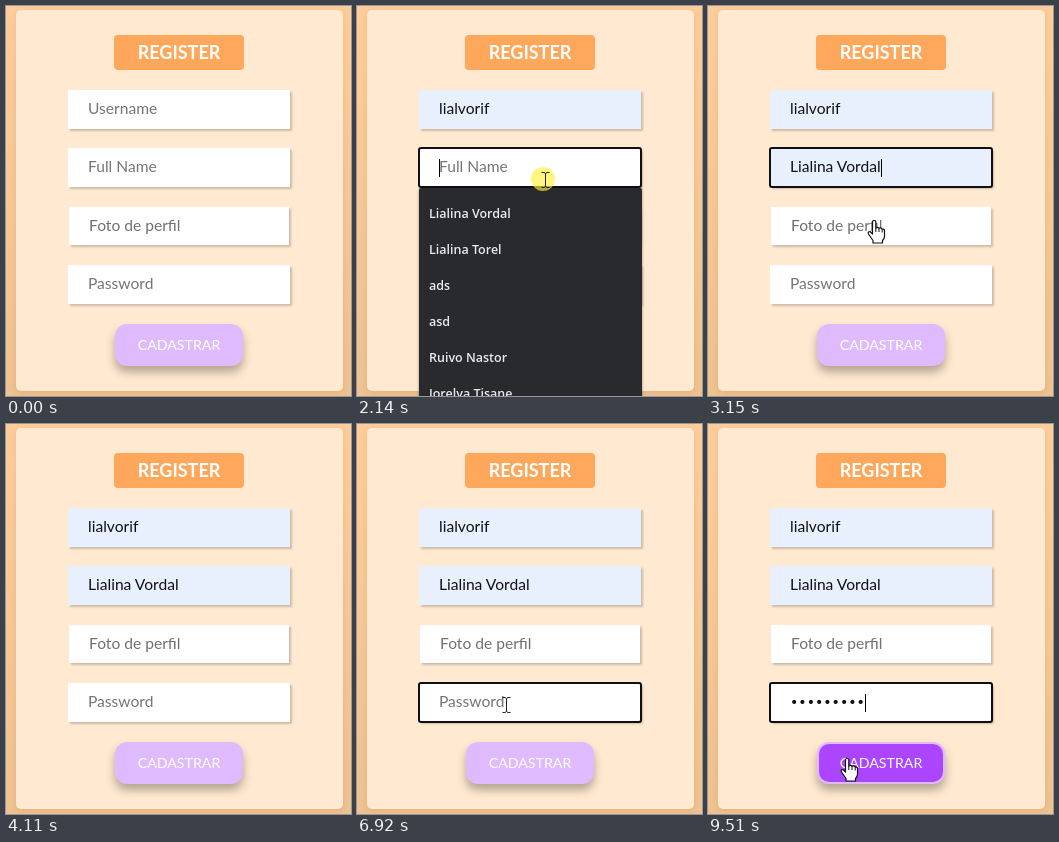
These frames come from a looping animation (345 by 390 pixels, 9540 ms). An HTML page:

```html
<!DOCTYPE html>
<html lang="pt">
<head>
<meta charset="utf-8">
<title>Register</title>
<style>
  html, body { margin: 0; width: 100%; height: 100%; overflow: hidden; }
  body { position: relative; background: linear-gradient(#ffcd9a, #efc291); font: 15.6px Lato, sans-serif; }
  body * { box-sizing: border-box; }
  .card, .title, .field, .list, .button, #pointer, #pointer > * { position: absolute; }
  .card { left: 10px; top: 4px; width: 327px; height: 381px; border-radius: 5px; background: #ffe9d0; box-shadow: 0 2px 6px #9a5c2026; }
  .title { left: 108px; top: 29px; width: 130px; height: 35px; border-radius: 4px; background: #ffa75a;
    color: #fff; font-weight: 700; font-size: 18px; line-height: 34px; text-align: center; }
  .field { left: 62px; width: 222px; height: 38.5px; padding-left: 20px; background: #fff; color: #111;
    line-height: 37.5px; white-space: pre; box-shadow: 2px 2px 2px #0003; }
  .field.upload { left: 63px; width: 220px; color: #707070; }
  .field.filled { background: #e8f0fe; }
  .field.focus { outline: 2px solid #101014; outline-offset: -1px; border-radius: 2px; }
  .field.preview { font: 13px/37.5px "Open Sans", sans-serif; }
  .field.secret .value { font: 14.1px/37.5px "DejaVu Sans", sans-serif; }
  .hint { color: #757575; }
  .caret { display: inline-block; width: 1px; height: 18px; margin-right: -1px; background: #000; vertical-align: middle; }
  .button { left: 109px; top: 318px; width: 128px; height: 42px; border: 2px solid #e0bafe; border-radius: 12px;
    background: #e0bafe; color: #fff; font-size: 14.2px; line-height: 38px; text-align: center; box-shadow: 0 6px 10px #0000004d; }
  .button.hover { background: #ab45ff; }
  .list { left: 62px; width: 223px; height: 232px; padding: 8px 0; border-radius: 2px; background: #292a2d;
    color: #e8eaed; font: 600 12.5px/36px "Open Sans", sans-serif; box-shadow: 0 1px 3px #0006; }
  .list div { padding-left: 10px; }
  .list .hover { background: #3f4042; }
  #pointer { left: 0; top: 0; }
  #click { left: -14px; top: -13px; width: 24px; height: 24px; border-radius: 50%; background: #fff23ca8; }
  #pointer svg { left: 0; top: 0; overflow: visible; }
</style>
</head>
<body>
<div class="card"></div>
<div class="title">REGISTER</div>
<div class="field" id="user" style="top:84px"></div>
<div class="field" id="name" style="top:142px"></div>
<div class="field upload" style="top:200.5px">Foto de perfil</div>
<div class="field secret" id="pass" style="top:259px"></div>
<div class="button" id="button">CADASTRAR</div>
<div class="list" id="users" style="top:124px"></div>
<div class="list" id="names" style="top:182px"></div>
<div id="pointer">
  <div id="click"></div>
  <svg id="arrow" width="1" height="1"><path d="M.5.5V16.5L4.2 13 6.8 19 9.4 17.9 6.8 12H11.8Z" fill="#fff" stroke="#111"/></svg>
  <svg id="beam" width="1" height="1"><path d="M-3.5-7.5H-1L.5-6.5 2-7.5H4.5M.5-6.5V6.5M-3.5 7.5H-1L.5 6.5 2 7.5H4.5" fill="none" stroke="#222"/></svg>
  <svg id="hand" width="1" height="1"><path d="M-1.5 1.5Q0-1 1.8 1.5V8Q3.5 6.5 5 8.3 7 7 8.2 9.3 10.5 8.5 10.5 11V16Q10.5 19 8.5 20.5V23H-1V20.5L-5.5 14Q-6.5 11.5-4 11.5L-1.5 14Z" fill="#fff" stroke="#111" stroke-width="1.2" stroke-linejoin="round"/><path d="M1.8 8V12M5 8.5V12M8.2 9.5V12.5" stroke="#111"/></svg>
</div>
<script>
const LOOP = 9540;
const $ = id => document.getElementById(id);
const users = ["lua456", "lialvorif", "ruivo456", "4830594", "jorelya", "lialvorif@mail.test"];
const names = ["Lialina Vordal", "Lialina Torel", "ads", "asd", "Ruivo Nastor", "Jorelya Tisane"];

// [time, x, y] of the pointer hot spot
const path = [
  [100, 345, 130], [760, 197, 105], [900, 196, 108], [1050, 195, 140], [1170, 194, 165], [1290, 188, 174],
  [2340, 188, 174], [2600, 150, 206], [2850, 150, 207], [3150, 166, 214], [3300, 166, 216],
  [3480, 166, 219], [3720, 165, 246], [4110, 9, 252],
  [6060, -4, 280], [6350, 149, 281], [9210, 149, 281], [9320, 139, 334]
];
const shapes = [
  [0, ""], [100, "arrow"], [400, "beam"], [900, "arrow"], [1520, ""], [1720, "beam"], [2400, "arrow"],
  [2780, "beam"], [3040, "hand"], [3600, "arrow"], [4110, ""], [6060, "arrow"], [6230, "beam"],
  [7730, ""], [9210, "beam"], [9250, "arrow"], [9280, "hand"]
];
const clicks = [[760, 880], [1450, 1520], [2050, 2160], [2720, 2780], [3300, 3420], [6380, 6470]];
const keys = [7320, 7550, 7670, 7900, 8000, 8110, 8220, 8330, 8430];

const within = (t, a, b) => t >= a && t < b;
const latest = (t, steps) => steps.filter(s => s[0] <= t).pop()[1];

function position(t) {
  const i = path.findIndex(p => p[0] > t);
  if (i < 0) return path[path.length - 1].slice(1);
  const [t1, x1, y1] = path[i], [t0, x0, y0] = path[Math.max(i - 1, 0)];
  const p = t1 > t0 ? (t - t0) / (t1 - t0) : 0, e = p * p * (3 - 2 * p);
  return [x0 + (x1 - x0) * e, y0 + (y1 - y0) * e];
}

function setField(id, hint, value, { focus, caret, preview, filled }) {
  const el = $(id);
  el.classList.toggle("focus", focus);
  el.classList.toggle("preview", !!preview);
  el.classList.toggle("filled", !!filled);
  const bar = caret ? '<i class="caret"></i>' : "";
  const html = value ? `<span class="value">${value}</span>${bar}` : `${bar}<span class="hint">${hint}</span>`;
  if (el.dataset.html !== html) el.innerHTML = el.dataset.html = html;
}

function setList(id, open, selected) {
  $(id).style.display = open ? "" : "none";
  [...$(id).children].forEach((row, i) => row.classList.toggle("hover", i === selected));
}

function render(t) {
  const userRow = latest(t, [[0, -1], [1080, 0], [1270, 1]]);
  const nameRow = t < 2430 ? -1 : 0;
  const userFocus = within(t, 800, 2050), nameFocus = within(t, 2080, 3420);
  const userPreview = within(t, 1080, 1520), namePreview = within(t, 2430, 2780);
  setField("user", "Username", users[userRow], {
    focus: userFocus, caret: userFocus && !userPreview, preview: userPreview, filled: userRow >= 0 });
  setField("name", "Full Name", names[nameRow], {
    focus: nameFocus, caret: nameFocus && !namePreview, preview: namePreview, filled: nameRow >= 0 });
  setField("pass", "Password", "•".repeat(keys.filter(k => k <= t).length), {
    focus: t >= 6410, caret: t >= 6410 && !within(t, 6920, 7320) && !within(t, 8980, 9510) });
  setList("users", within(t, 900, 1520), userRow);
  setList("names", within(t, 2080, 2780), nameRow);
  $("button").classList.toggle("hover", t >= 9280);

  const [x, y] = position(t), shape = latest(t, shapes);
  $("pointer").style.transform = `translate(${Math.round(x)}px, ${Math.round(y)}px)`;
  for (const id of ["arrow", "beam", "hand"]) $(id).style.display = id === shape ? "" : "none";
  $("click").style.display = clicks.some(([a, b]) => within(t, a, b)) ? "" : "none";
}

$("users").innerHTML = users.map(u => `<div>${u}</div>`).join("");
$("names").innerHTML = names.map(n => `<div>${n}</div>`).join("");

const start = performance.now();
function tick() {
  render((performance.now() - start) % LOOP);
  requestAnimationFrame(tick);
}
tick();
</script>
</body>
</html>
```
